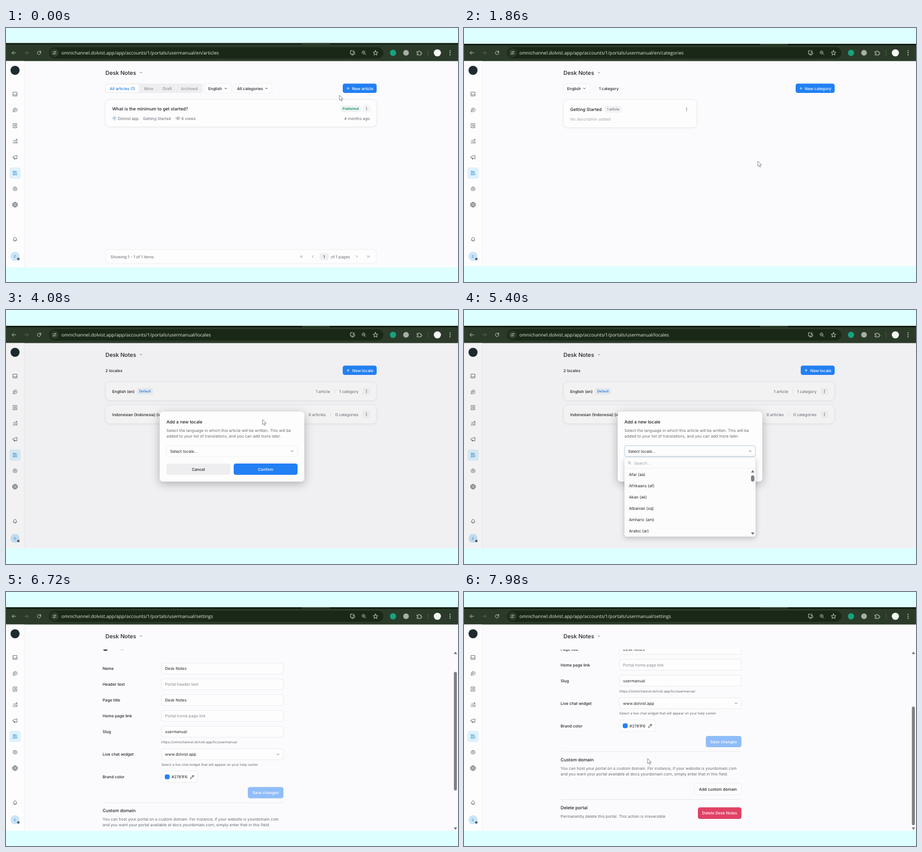
Animation, 800 px wide and 450 px high, one loop 8000 ms. Source, as an HTML page with a canvas:

```html
<!DOCTYPE html>
<html lang="en">
<head>
<meta charset="utf-8">
<title>Help center tour</title>
<style>
html, body { margin: 0; width: 100%; height: 100%; overflow: hidden; background: #deffff; }
canvas { display: block; width: 800px; height: 450px; }
</style>
</head>
<body>
<canvas id="stage" width="800" height="450"></canvas>
<script>
const ctx = document.getElementById('stage').getContext('2d');
const LOOP = 8000, STEP = 60, SLIDE = 544;
const PORTAL = 'Desk Notes', BRAND = 'Dolvist.app', AUTHOR = 'Corine';
const HOST = 'omnichannel.dolvist.app';
const INK = '#202127', GRAY = '#666870', PALE = '#9b9da4', BLUE = '#2280f4', SOFT = '#90bdf8';
const LINE = '#ebebee', PAGE = '#fbfbfd';

// ---------- helpers ----------
function text(s, x, y, { size = 7, color = INK, weight = 400, align = 'left', family = 'Inter' } = {}) {
  ctx.font = `${weight} ${size}px ${family}, sans-serif`;
  ctx.fillStyle = color;
  ctx.textAlign = align;
  ctx.fillText(s, x, y + size * 0.364);
}

function box(x, y, w, h, r, fill, stroke) {
  ctx.beginPath();
  ctx.roundRect(x, y, w, h, r);
  if (fill) { ctx.fillStyle = fill; ctx.fill(); }
  if (stroke) { ctx.strokeStyle = stroke; ctx.lineWidth = 0.8; ctx.stroke(); }
}

function shadowed(blur, alpha, draw) {
  ctx.save();
  ctx.shadowColor = `rgba(20,22,30,${alpha})`;
  ctx.shadowBlur = blur;
  ctx.shadowOffsetY = blur / 4;
  draw();
  ctx.restore();
}

function dot(x, y, r, fill) {
  ctx.beginPath();
  ctx.arc(x, y, r, 0, 7);
  ctx.fillStyle = fill;
  ctx.fill();
}

function rule(x, y, w, h, color = LINE) {
  ctx.fillStyle = color;
  ctx.fillRect(x, y, w, h);
}

// Icons live on a 24-unit grid, centred on x, y.
function icon(name, x, y, size, color = '#55585f', width = 2) {
  ctx.save();
  ctx.translate(x - size / 2, y - size / 2);
  ctx.scale(size / 24, size / 24);
  ctx.strokeStyle = color;
  ctx.lineWidth = width;
  ctx.lineCap = ctx.lineJoin = 'round';
  ctx.stroke(new Path2D(ICONS[name]));
  ctx.restore();
}

const ICONS = {
  down: 'M5 9l7 7 7-7', up: 'M5 15l7-7 7 7', left: 'M15 5l-7 7 7 7', right: 'M9 5l7 7-7 7',
  first: 'M11 6l-6 6 6 6M19 6l-6 6 6 6', last: 'M5 6l6 6-6 6M13 6l6 6-6 6',
  plus: 'M12 4v16M4 12h16',
  back: 'M21 12H4M11 4l-8 8 8 8', forward: 'M3 12h17M13 4l8 8-8 8',
  reload: 'M20 12a8 8 0 1 1-2.5-5.8L20 9M20 3v6h-6',
  tune: 'M3 7h8M19 7h2M3 17h2M13 17h8M15 4a3 3 0 1 0 .1 0M9 14a3 3 0 1 0 .1 0',
  install: 'M12 3H3v14h18v-4M8 21h8M17 2v9M13 8l4 4 4-4',
  zoom: 'M10 3a7 7 0 1 0 .1 0M15 15l6 6M7 10h6',
  star: 'M12 2l3 7 7 .6-5.4 4.8 1.7 7.1L12 17.7 5.7 21.5l1.7-7.1L2 9.6 9 9z',
  puzzle: 'M4 7h5a3 3 0 1 1 6 0h5v5a3 3 0 1 1 0 5v4H4v-5a3 3 0 1 0 0-5z',
  inbox: 'M3 3h18v18H3zM3 14h5c1 4 7 4 8 0h5',
  chat: 'M3 21l1.5-5A9 9 0 1 1 8 20zM8 10h8M8 14h5',
  contact: 'M4 2h16v20H4zM12 7a2.5 2.5 0 1 0 .1 0M8 17c1-4 7-4 8 0',
  chart: 'M4 21v-5M10 21V12M16 21V14M21 21V10M3 10l6-4 5 3 7-7M16 2h5v5',
  horn: 'M3 9l18-6v17L3 15zM7 16l1 5h4l-1-4',
  books: 'M3 3v18M7 3v18M12 3v18M3 3h4M3 21h9M7 5h5M14 4l4-1 4 17-4 1z',
  gear: 'M12 2l3 3h4l1 4 2 3-2 3-1 4h-4l-3 3-3-3H5l-1-4-2-3 2-3 1-4h4zM12 8.5a3.5 3.5 0 1 0 .1 0',
  chip: 'M4 4h16v16H4zM9 9h6v6H9zM8 0v4M12 0v4M16 0v4M8 20v4M12 20v4M16 20v4M0 8h4M0 12h4M0 16h4M20 8h4M20 12h4M20 16h4',
  bell: 'M4 17c3-3 1-8 3-11s8-3 10 0 0 8 3 11zM9 21h6',
  eye: 'M1 12c5-10 17-10 22 0-5 10-17 10-22 0zM12 8.5a3.5 3.5 0 1 0 .1 0',
  shapes: 'M12 3l5 8H7zM3 14h7v7H3zM18 14a3.5 3.5 0 1 0 .1 0',
  smile: 'M19 6a10 10 0 1 1-4-3M8 14c2 4 6 4 8 0M8.5 9v.5M15 9v.5M20 1v6M17 4h6',
  dropper: 'M3 21l1-5L14 6l4 4L8 20zM12 4l8 8M16 8l4-5 1 1-4 5',
  search: 'M10 3a7 7 0 1 0 .1 0M15 15l6 6'
};

function kebab(x, y, framed = true) {
  if (framed) box(x - 6, y - 6, 12, 12, 3, '#f6f6f8', '#f0f0f2');
  for (const d of [-2.2, 0, 2.2]) dot(x, y + d, 0.7, '#4a4c53');
}

function card(x, y, w, h, r = 8) {
  shadowed(4, 0.06, () => box(x, y, w, h, r, '#fdfdfe'));
  box(x, y, w, h, r, null, '#e9e9ed');
}

function addButton(x, label) {
  box(x, 98.5, 656 - x, 16.5, 4, BLUE);
  icon('plus', x + 9.5, 107, 6, '#fff', 3);
  text(label, 650, 107, { color: '#fff', weight: 500, align: 'right' });
}

function button(x, y, w, h, label, fill, color, stroke) {
  box(x, y, w, h, 4, fill, stroke);
  text(label, x + w / 2, y + h / 2, { color, weight: 500, align: 'center' });
}

function pill(x, y, w, label, color, fill, weight = 500) {
  box(x, y - 6, w, 12, 3, fill);
  text(label, x + w / 2, y, { size: 6, color, weight, align: 'center' });
}

function picker(x, w, label) {
  box(x, 98.5, w, 16.5, 4, '#fdfdfe', '#ededf0');
  text(label, x + 6.5, 107, { weight: 500 });
  icon('down', x + w - 10, 107, 6, INK, 3);
}

function field(x, y, w, value, color = INK, fill = '#fdfdfe', stroke = '#e8e8ec') {
  box(x, y - 9.7, w, 19.4, 4, fill, stroke);
  text(value, x + 6.5, y, { color });
}

function pointer(x, y) {
  ctx.save();
  ctx.translate(x, y);
  ctx.beginPath();
  [[0, 0], [0, 9], [2.2, 7.2], [3.7, 10.5], [5, 9.9], [3.6, 6.7], [6.5, 6.5]]
    .forEach(([px, py]) => ctx.lineTo(px, py));
  ctx.closePath();
  ctx.fillStyle = '#fff';
  ctx.strokeStyle = '#70737a';
  ctx.lineWidth = 0.8;
  ctx.fill();
  ctx.stroke();
  ctx.restore();
}

const easeCubic = p => p < 0.5 ? 4 * p ** 3 : 1 - (2 - 2 * p) ** 3 / 2;
const ramp = (t, start, length) => easeCubic(Math.min(1, Math.max(0, (t - start) / length)));

// Keys are [time, x, y]; the pointer shows only between the first and last key.
function movePointer(t, keys) {
  for (let i = 1; i < keys.length; i++) {
    const [t0, x0, y0] = keys[i - 1], [t1, x1, y1] = keys[i];
    if (t < t0 || t >= t1) continue;
    const p = ramp(t, t0, t1 - t0);
    pointer(x0 + (x1 - x0) * p, y0 + (y1 - y0) * p);
  }
}

// ---------- browser and sidebar ----------
function chrome(path, top) {
  const light = '#dfe5dc';
  rule(0, top, 800, 58.6 - top, '#2b3a29');
  rule(0, top, 800, 2.5, '#0f190e');
  rule(524, top, 49, 2.5, '#2b3a29');
  box(76, 34, 592, 20, 10, '#1a2818');
  icon('back', 14, 44, 9, light);
  icon('forward', 36, 44, 9, '#6d7a6a');
  icon('reload', 58.5, 44, 9, light);
  dot(86, 44, 7.5, '#2b3a29');
  icon('tune', 86, 44, 8, light);
  text(HOST + '/app/accounts/1/portals/usermanual' + path, 98, 44,
    { size: 8.22, color: '#e6ebe4', family: '"Open Sans"' });
  icon('install', 613.5, 44, 10, light);
  icon('zoom', 633.5, 44, 9, light);
  icon('star', 654, 44, 10, light);
  dot(685, 44, 5.5, '#15a37f');
  dot(708, 44, 5, '#a9aea8');
  icon('puzzle', 731, 44, 10, light);
  rule(746.5, 39, 0.8, 10, '#566553');
  dot(763.5, 44, 6.3, '#f6f8f6');
  for (const d of [-3.5, 0, 3.5]) dot(786, 44 + d, 0.9, light);
}

function sidebar() {
  rule(0, 58.6, 32, 366, '#fdfdfe');
  rule(32, 58.6, 0.8, 366, '#efeff2');
  dot(16, 75, 8, '#1d2b30');
  box(6, 247, 20, 20, 4, '#e0f1fb');
  ['inbox', 'chat', 'contact', 'chart', 'horn', 'books', 'gear', 'chip'].forEach((name, i) =>
    icon(name, 16, 117 + i * 28, 9, name === 'books' ? '#4aa3df' : '#4d5057'));
  icon('bell', 16, 374, 9, '#4d5057');
  dot(16, 404.5, 8, '#cbe5f8');
  text('C', 16, 404.5, { size: 6, color: '#3c86c4', weight: 500, align: 'center' });
  dot(21.8, 409.3, 2.2, '#59636e');
}

function heading() {
  text(PORTAL, 176, 79, { size: 9.9, weight: 500 });
  icon('down', 239, 79, 5, INK, 3);
}

// ---------- pages ----------
function articles(t) {
  heading();
  box(176, 98.5, 172, 16.5, 4, '#eeeef1');
  box(176.5, 99, 59.5, 15.5, 4, '#fff', '#e6e6ea');
  text('All articles (1)', 206, 107, { color: '#2079dc', weight: 500, align: 'center' });
  [['Mine', 252.5], ['Draft', 285.5], ['Archived', 324.5]].forEach(([s, x]) =>
    text(s, x, 107, { color: '#808289', align: 'center' }));
  rule(268.5, 103, 0.6, 8, '#dfdfe3');
  picker(351.5, 47.5, 'English');
  picker(402.5, 68.5, 'All categories');
  addButton(596, 'New article');

  card(176, 126.5, 480, 48.5);
  text('What is the minimum to get started?', 188, 143, { size: 7.8, weight: 500 });
  pill(592, 143, 36, 'Published', '#13866f', '#edf5f2', 600);
  kebab(638, 143);
  dot(192, 160, 4, '#d9e6f2');
  text('D', 192, 160, { size: 4, color: '#57677a', align: 'center' });
  text(BRAND, 198, 160, { color: GRAY });
  text('Getting Started', 242.5, 160, { size: 6.9, color: GRAY });
  icon('eye', 304.5, 160, 7.5);
  text('6 views', 310.5, 160, { color: GRAY });
  text('4 months ago', 644, 160, { color: GRAY, align: 'right' });

  box(176.5, 392.5, 479, 24.5, 6, '#fdfdfe', LINE);
  text('Showing 1 - 1 of 1 items', 185, 405, { color: GRAY });
  [['first', 522.5], ['left', 543], ['right', 621], ['last', 641.5]].forEach(([n, x]) =>
    icon(n, x, 405, 6.5, '#62656c', 2.2));
  box(555, 399, 16, 12, 3, '#efeff2');
  text('1', 563, 405, { align: 'center' });
  text('of 1 pages', 575, 405, { color: GRAY });
  movePointer(t, [[0, 590, 119], [360, 622, 106], [540, 622, 106]]);
}

function editor() {
  icon('left', 186, 79, 6, INK, 2.5);
  text('Back to articles', 193, 79, { size: 6.9, weight: 500, color: '#3c3e45' });
  text('Preview', 594, 79, { color: '#85878e', align: 'right' });
  box(603.5, 71, 52.5, 16, 4, SOFT);
  text('Publish', 622, 79, { color: '#fff', weight: 500, align: 'center' });
  rule(640, 71, 0.7, 16, '#a9ccfa');
  icon('down', 648, 79, 5, '#fff', 3);
  text('Title', 184, 123, { size: 16.2, color: '#7b7d83' });
  dot(646, 134, 6.5, '#fff');
  dot(646, 134, 5.5, '#15866f');
  dot(189, 159, 4.8, '#dddde0');
  text('C', 189, 159, { size: 4.5, color: '#777', align: 'center' });
  text(AUTHOR, 198, 159, { weight: 500 });
  icon('shapes', 243, 159, 7, INK);
  text('Getting Started', 250.5, 159, { size: 6.8, weight: 500 });
  icon('plus', 328, 159, 6, GRAY, 2.2);
  text('More properties', 336, 159, { color: '#80828a' });
  text('Write something...', 184, 186, { size: 7.9, color: '#b9bbc0' });
}

function categories(t) {
  heading();
  picker(176, 47, 'English');
  rule(230.5, 102, 0.7, 10);
  text('1 category', 239, 107, { weight: 500 });
  addButton(587, 'New category');
  card(176, 126.5, 236, 50);
  text('Getting Started', 188, 144, { size: 7.7, weight: 500 });
  pill(249, 144, 30, '1 article', '#55575e', '#f2f2f4', 400);
  kebab(394, 144, false);
  text('No description added', 188, 161, { color: '#a3a5ab' });
  if (t > 2340) categoryPanel();
  movePointer(t, [[1560, 520, 236], [1860, 520, 236], [2220, 620, 107], [2640, 620, 107]]);
}

function categoryPanel() {
  const fill = '#f1f1f3', edge = '#e6e6e9', hint = '#85878e';
  shadowed(10, 0.16, () => box(456, 120, 200, 292, 6, '#fdfdfe'));
  text('Create category', 468, 137.5, { size: 7.8, weight: 500 });
  box(468, 155, 176, 41, 4, null, LINE);
  rule(556, 165, 0.7, 22);
  text('Portal', 477, 169, { color: GRAY });
  text(PORTAL, 477, 183);
  text('Locale', 572, 169, { color: GRAY });
  text('English (en)', 572, 183);
  text('Name', 468, 209.5, { weight: 500 });
  box(468, 219.7, 176, 19.6, 4, fill, edge);
  box(468.4, 220.1, 20, 18.8, [4, 0, 0, 4], '#fafafb');
  icon('smile', 478.5, 229.5, 7.5, INK);
  text('Category name', 493, 229.5, { color: hint });
  text('Slug', 468, 252.5, { weight: 500 });
  field(468, 270.5, 176, 'Category slug for urls', hint, fill, edge);
  text(HOST + '/hc/usermanual/en/categories/', 468, 289, { size: 5.9, color: GRAY });
  text('Description', 468, 305.5, { weight: 500 });
  box(468, 313.7, 176, 57.8, 4, fill, edge);
  text('Give a short description about the category.', 475, 324.5, { color: hint });
  text('0 / 200', 637, 362, { size: 6.2, color: GRAY, align: 'right' });
  button(468, 380, 85, 20, 'Cancel', '#eff0f2', '#2079dc');
  button(559, 380, 85, 20, 'Create', SOFT, '#fff');
}

function localeRow(y, name, right, articlesCount, categoriesCount) {
  card(176, y - 17, 480, 33.5);
  text(name, 188, y, { weight: 500 });
  text(articlesCount, right, y, { color: GRAY, align: 'right' });
  rule(right + 8, y - 4, 0.7, 8, '#e0e0e4');
  text(categoriesCount, 624, y, { color: GRAY, align: 'right' });
  kebab(638, y);
}

function locales(t) {
  heading();
  text('2 locales', 176, 107, { weight: 500 });
  localeRow(144, 'English (en)', 573.5, '1 article', '1 category');
  pill(232, 144, 28, 'Default', '#2079dc', '#eef2f7');
  localeRow(185, 'Indonesian (Indonesia) (id)', 566, '0 articles', '0 categories');
  if (t > 3840) rule(0, 58.6, 800, 370, 'rgba(0,0,0,.045)');
  addButton(596, 'New locale');
  if (t > 3840) localeDialog(t > 4620);
  movePointer(t, [[3660, 622, 106], [3840, 622, 106], [4080, 454, 194], [4440, 470, 249], [5340, 470, 249]]);
}

function localeDialog(open) {
  shadowed(16, 0.3, () => box(272, 180, 256, 124, 6, '#fdfdfd'));
  text('Add a new locale', 284, 198, { size: 7.8, weight: 500 });
  text('Select the language in which this article will be written. This will be', 284, 213, { color: GRAY });
  text('added to your list of translations, and you can add more later.', 284, 223, { color: GRAY });
  field(284, 250, 232, 'Select locale...', INK, '#fdfdfd', open ? '#a9bfdf' : '#eeeef1');
  icon(open ? 'up' : 'down', 506.5, 250, 6, INK, 2.5);
  button(284, 272, 113, 20, 'Cancel', '#eeeef1', INK);
  button(403, 272, 113, 20, 'Confirm', BLUE, '#fff');
  if (!open) return;
  shadowed(10, 0.25, () => box(284, 262, 232, 139.5, 4, '#fcfcfc'));
  icon('search', 293, 271, 6.5, GRAY);
  text('Search...', 301, 271, { color: PALE });
  rule(284, 280, 232, 0.7);
  ['Afar (aa)', 'Afrikaans (af)', 'Akan (ak)', 'Albanian (sq)', 'Amharic (am)', 'Arabic (ar)'].forEach((s, i) =>
    text(s, 292, 291 + i * 20));
  arrow(511, 286, -1);
  arrow(511, 396, 1);
  box(508, 293, 6, 11, 3, '#808084');
}

function arrow(x, y, dir) {
  ctx.beginPath();
  ctx.moveTo(x - 3, y - 2 * dir);
  ctx.lineTo(x + 3, y - 2 * dir);
  ctx.lineTo(x, y + 2.5 * dir);
  ctx.fillStyle = '#77787c';
  ctx.fill();
}

function settings(t) {
  const scroll = 87 * ramp(t, 6480, 480) + 47 * ramp(t, 7260, 360);
  heading();
  ctx.save();
  ctx.beginPath();
  ctx.rect(33, 103, 767, 321);
  ctx.clip();
  ctx.translate(0, 1 - scroll);
  settingsForm();
  ctx.restore();
  arrow(795.5, 109, -1);
  arrow(795.5, 420, 1);
  box(792.7, 113 + scroll * 0.68, 5.3, 210, 2.6, '#808084');
  movePointer(t, [[7560, 344, 262], [7860, 325, 296], [LOOP, 325, 296]]);
}

function settingsForm() {
  const label = (s, y) => text(s, 171, y, { weight: 500 });
  const note = (s, y) => text(s, 275, y, { size: 6, color: GRAY });
  label('Logo', 115);
  dot(176, 143, 4.8, '#1d2b30');
  text(BRAND, 182, 144, { size: 5, weight: 600 });
  [['Name', PORTAL], ['Header text', 'Portal header text', 1], ['Page title', PORTAL],
    ['Home page link', 'Portal home page link', 1], ['Slug', 'usermanual']].forEach(([name, value, empty], i) => {
    label(name, 179 + i * 28);
    field(275, 179 + i * 28, 216, value, empty ? '#85878e' : INK);
  });
  note('https://' + HOST + '/hc/usermanual', 309.5);
  label('Live chat widget', 331);
  field(275, 331, 216, 'www.dolvist.app');
  icon('down', 481.5, 331, 6, INK, 2.5);
  note('Select a live chat widget that will appear on your help center', 349);
  label('Brand color', 371);
  box(275, 360.5, 64, 20.5, 4, '#fdfdfe', LINE);
  box(281, 366.7, 8.6, 8.6, 3, '#2781f6');
  text('#2781F6', 293, 371);
  icon('dropper', 329.5, 371, 8, INK);
  button(428, 389, 63, 20, 'Save changes', SOFT, '#fff');
  rule(171, 416.5, 320, 0.8, '#e6e6ea');
  text('Custom domain', 171, 431, { size: 7.8, weight: 500 });
  text('You can host your portal on a custom domain. For instance, if your website is yourdomain.com', 171, 446, { color: GRAY });
  text('and you want your portal available at docs.yourdomain.com, simply enter that in this field.', 171, 456, { color: GRAY });
  button(408, 473, 83, 20, 'Add custom domain', '#fdfdfe', INK, LINE);
  rule(171, 501, 320, 0.8, '#e6e6ea');
  text('Delete portal', 171, 516, { size: 7.8, weight: 500 });
  text('Permanently delete this portal. This action is irreversible', 171, 531, { color: GRAY });
  button(414, 515.5, 77, 20.5, 'Delete ' + PORTAL, '#e04265', '#fff');
}

// ---------- timeline ----------
const SHOTS = [
  { start: 0, top: 26.5, bottom: 424, shift: 0, path: t => t < 540 ? '/en/articles' : '/en/articles/new',
    body: t => t < 540 ? articles(t) : editor() },
  { start: 990, top: 28, bottom: 422, shift: 0, path: () => '/en/categories', body: categories },
  { start: 3125, top: 28, bottom: 422, shift: 0, path: () => '/locales', body: locales },
  { start: 5723, top: 28, bottom: 424, shift: -1, path: () => '/settings', body: settings }
];

function drawShot(shot, t, x) {
  ctx.save();
  ctx.translate(x, shot.shift);
  ctx.beginPath();
  ctx.rect(0, shot.top, 800, shot.bottom - shot.top);
  ctx.clip();
  rule(0, shot.top, 800, 400, PAGE);
  chrome(shot.path(t), shot.top);
  sidebar();
  shot.body(t);
  ctx.restore();
}

function frame(now) {
  // Hold each pose for one step, like recorded footage.
  const t = Math.floor(now % LOOP / STEP) * STEP;
  ctx.textRendering = 'geometricPrecision';
  rule(0, 0, 800, 450, '#deffff');
  let i = SHOTS.length - 1;
  while (SHOTS[i].start > t) i--;
  const slide = i ? ramp(t, SHOTS[i].start, SLIDE) : 1;
  const x = Math.round(800 * (1 - slide));
  if (slide < 1) drawShot(SHOTS[i - 1], t, x - 800);
  drawShot(SHOTS[i], t, x);
  requestAnimationFrame(frame);
}
requestAnimationFrame(frame);
</script>
</body>
</html>
```
